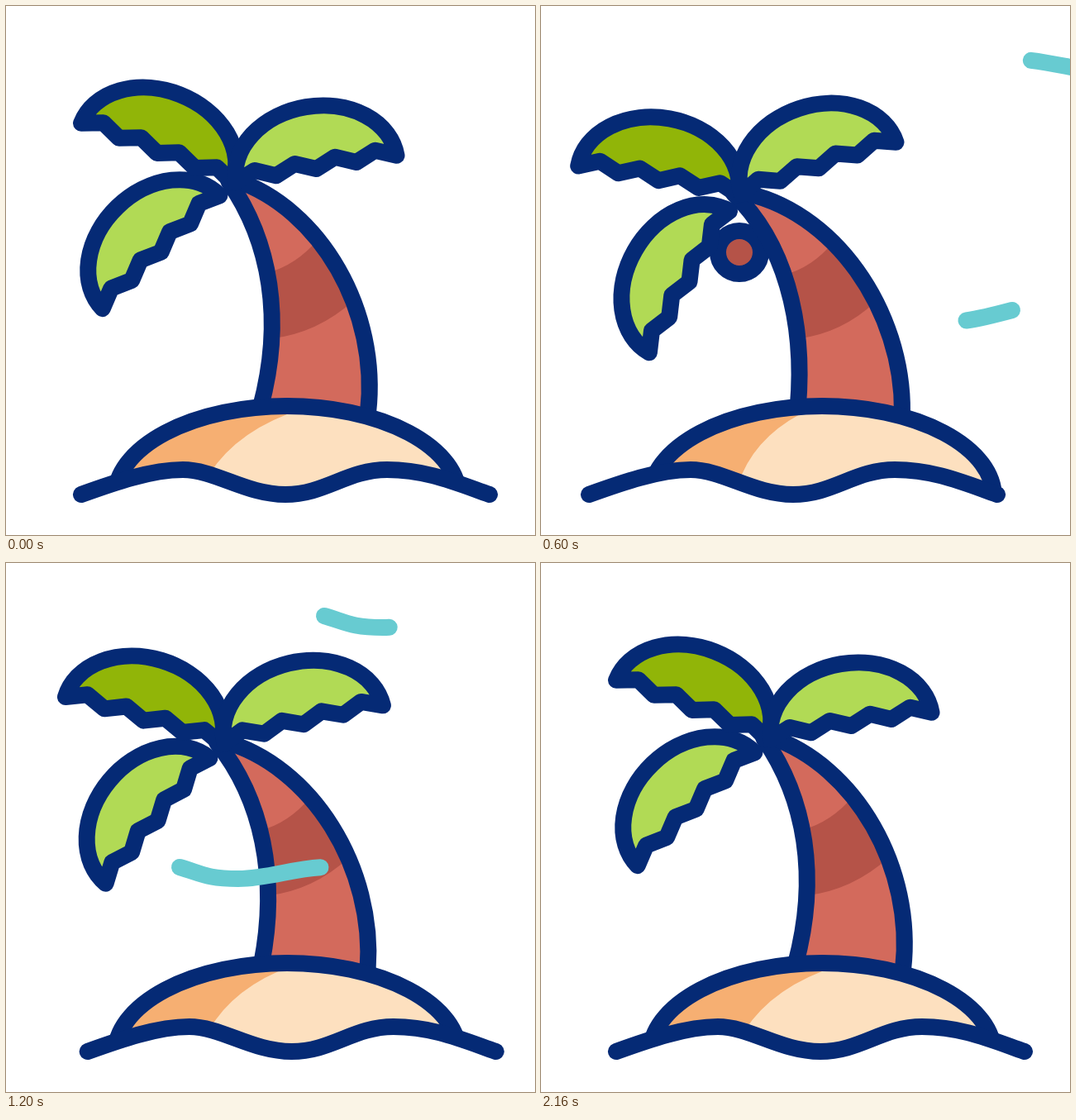
Write an HTML page with a canvas that moves like this. It is 640x640 px and loops after 2.64 s.

```html
<!DOCTYPE html>
<html>
<head>
<meta charset="utf-8">
<style>
html, body { margin: 0; width: 100%; height: 100%; overflow: hidden; background: #fff; }
canvas { display: block; width: 640px; height: 640px; }
</style>
</head>
<body>
<canvas id="stage" width="640" height="640"></canvas>
<script>
const ctx = document.getElementById('stage').getContext('2d');
const LOOP = 2640, STEP = 40;
const NAVY = '#052a75', BARK = '#d36a5c', DARK_BARK = '#b55348', AQUA = '#67cbd1';
const SAND = '#fde0bf', SAND_SHADE = '#f6af72', LEAF = '#b1da55', DARK_LEAF = '#91b508';

const rad = deg => deg * Math.PI / 180;
const clamp = v => Math.min(1, Math.max(0, v));
const sine = s => (1 - Math.cos(Math.PI * s)) / 2;
const settle = s => 1 - (1 - s) ** 1.7;

// Keys are [time, value, easing towards it].
const LEAN = [[40, 0], [400, 18.3], [620, -8], [1840, -.3, settle], [2000, 1.5], [2160, 0]];
const TIDE = [[40, 0], [650, -33.5], [1540, 27], [2020, 0]];

function tween(keys, t) {
  const i = keys.findIndex(k => t < k[0]);
  if (i < 1) return 0;
  const [t0, v0] = keys[i - 1], [t1, v1, ease = sine] = keys[i];
  return v0 + (v1 - v0) * ease((t - t0) / (t1 - t0));
}

// One toothed leaf, its base at the origin and its tip to the left.
function leafPath(length = 197, arch = 76, teeth = 8, depth = 10.4) {
  const path = new Path2D();
  path.ellipse(-length / 2, 0, length / 2, arch, 0, Math.PI, 2 * Math.PI);
  for (let i = teeth - 1; i > 0; i--) path.lineTo(length * (i / teeth - 1), i % 2 ? -depth : 0);
  path.closePath();
  return path;
}
const LEAF_SHAPE = leafPath();
const FRONDS = [
  { color: LEAF, turn: -44, push: 22, flip: 1, sway: 2.2 },
  { color: DARK_LEAF, turn: 21.5, push: 0, flip: 1, sway: 1.7 },
  { color: LEAF, turn: -9.5, push: 4, flip: -1, sway: 1.5 }
];

// Gusts share one wavy path.
const GUST = new Path2D('M180,0 C150,8 125,14 105,14 S40,0 0,0 S-70,14 -109,14 S-155,7 -180,0');
const GUST_LENGTH = 366;
const GUSTS = [{ x: 565, y: 64, start: 355 }, { x: 390, y: 368, start: 510 }, { x: 622, y: 296, start: 985 }];

const DOME = new Path2D();
DOME.ellipse(340, 594, 208, 110, 0, 0, Math.PI * 2);
const SEA = 'M91,591 C130,577 175,561 214,561 S290,591 338,591 S413,561 461,561 S545,577 585,591';
const SEA_LINE = new Path2D(SEA);
const ABOVE_SEA = new Path2D(SEA + ' L800,660 V0 H-100 V660 Z');

function stroke(path, color = NAVY) {
  ctx.strokeStyle = color;
  ctx.stroke(path);
}

function fill(path, color) {
  ctx.fillStyle = color;
  ctx.fill(path);
}

function isolated(paint) {
  ctx.save();
  paint();
  ctx.restore();
}

// The crown swings on a circle around the foot of the trunk.
function crownAt(lean) {
  const a = rad(19 - lean);
  return [370 - 294 * Math.sin(a), 492 - 294 * Math.cos(a)];
}

function onCurve([a, b, c, d], t) {
  const s = 1 - t;
  return [0, 1].map(k => s ** 3 * a[k] + 3 * s * s * t * b[k] + 3 * s * t * t * c[k] + t ** 3 * d[k]);
}

function drawTrunk([x, y]) {
  const dx = x - 274, dy = y - 214;
  // Points follow the crown less and less towards the ground.
  const edge = (points, pull) => points.map(([px, py], i) => [px + pull[i] * dx, py + (i ? 0 : dy)]);
  const left = edge([[269, 212], [320, 285], [336, 380], [308, 485]], [1.03, .75, .46, -.08]);
  const right = edge([[276, 210], [381, 245], [452, 370], [438, 492]], [1.03, .74, .38, .03]);
  const line = ([a, ...rest]) => `M${a} C${rest}`;
  const ring = (a, b, sag) =>
    [a, [(a[0] + b[0]) / 2 + sag * .4, (a[1] + b[1]) / 2 + sag], b];
  const top = ring(onCurve(left, .45), onCurve(right, .375), 11);
  const low = ring(onCurve(right, .62), onCurve(left, .73), 16);

  fill(new Path2D(`${line(left)} L${right[3]} C${right[2]},${right[1]},${right[0]} Z`), BARK);
  fill(new Path2D(`M${top[0]} Q${top.slice(1)} L${low[0]} Q${low.slice(1)} Z`), DARK_BARK);
  stroke(new Path2D(line(left)));
  stroke(new Path2D(line(right)));
}

function drawCoconut(t, crown) {
  const grow = clamp((t - 440) / 160);
  if (!grow) return;
  const fall = Math.max(0, (t - 700) / 300) ** 2;
  const [x, y] = grow < 1
    ? [crown[0] + 2 * grow, crown[1] + 69 * grow]
    : [240 - 105 * fall, 298 + 96 * fall];
  if (x < -40) return;
  isolated(() => {
    ctx.translate(x, y);
    ctx.scale(grow, grow);
    const nut = new Path2D();
    nut.arc(0, 0, 26, 0, Math.PI * 2);
    fill(nut, DARK_BARK);
    stroke(nut);
  });
}

function drawFrond(crown, lean, { color, turn, push, flip, sway }) {
  isolated(() => {
    ctx.translate(...crown);
    ctx.rotate(rad(turn + lean * (sway + (2.2 - sway) * lean / 18.3)));
    ctx.scale(flip, 1);
    ctx.translate(-push, 0);
    fill(LEAF_SHAPE, color);
    stroke(LEAF_SHAPE);
  });
}

function drawIsland(tide, lean) {
  const d = 3.6 * lean;
  const shade = new Path2D(`M238,580 Q${268 + .45 * d},${522 - .1 * d} ${340 + d},${494 + Math.max(0, .1 * d)} l15,-14 H100 V620 H220 Z`);
  isolated(() => {
    ctx.translate(tide, 0);
    ctx.clip(ABOVE_SEA);
    ctx.translate(-tide, 0);
    fill(DOME, SAND);
    isolated(() => {
      ctx.clip(DOME);
      fill(shade, SAND_SHADE);
    });
    stroke(DOME);
  });
  isolated(() => {
    ctx.translate(tide, 0);
    stroke(SEA_LINE);
  });
}

function drawGust(t, { x, y, start }) {
  const head = GUST_LENGTH * clamp((t - start) / 580);
  const tail = GUST_LENGTH * clamp((t - start - 370) / 610);
  if (head <= tail) return;
  isolated(() => {
    ctx.translate(x, y);
    ctx.setLineDash([head - tail, 2000]);
    ctx.lineDashOffset = -tail;
    stroke(GUST, AQUA);
  });
}

function draw(t) {
  const lean = tween(LEAN, t), crown = crownAt(lean);
  ctx.fillStyle = '#fff';
  ctx.fillRect(0, 0, 640, 640);
  ctx.lineWidth = 20;
  ctx.lineCap = ctx.lineJoin = 'round';
  drawCoconut(t, crown);
  drawTrunk(crown);
  FRONDS.forEach(frond => drawFrond(crown, lean, frond));
  drawIsland(tween(TIDE, t), lean);
  GUSTS.forEach(gust => drawGust(t, gust));
}

const begin = performance.now();
function tick() {
  const t = (performance.now() - begin) % LOOP;
  draw(Math.floor(t / STEP) * STEP);
  requestAnimationFrame(tick);
}
tick();
</script>
</body>
</html>
```
